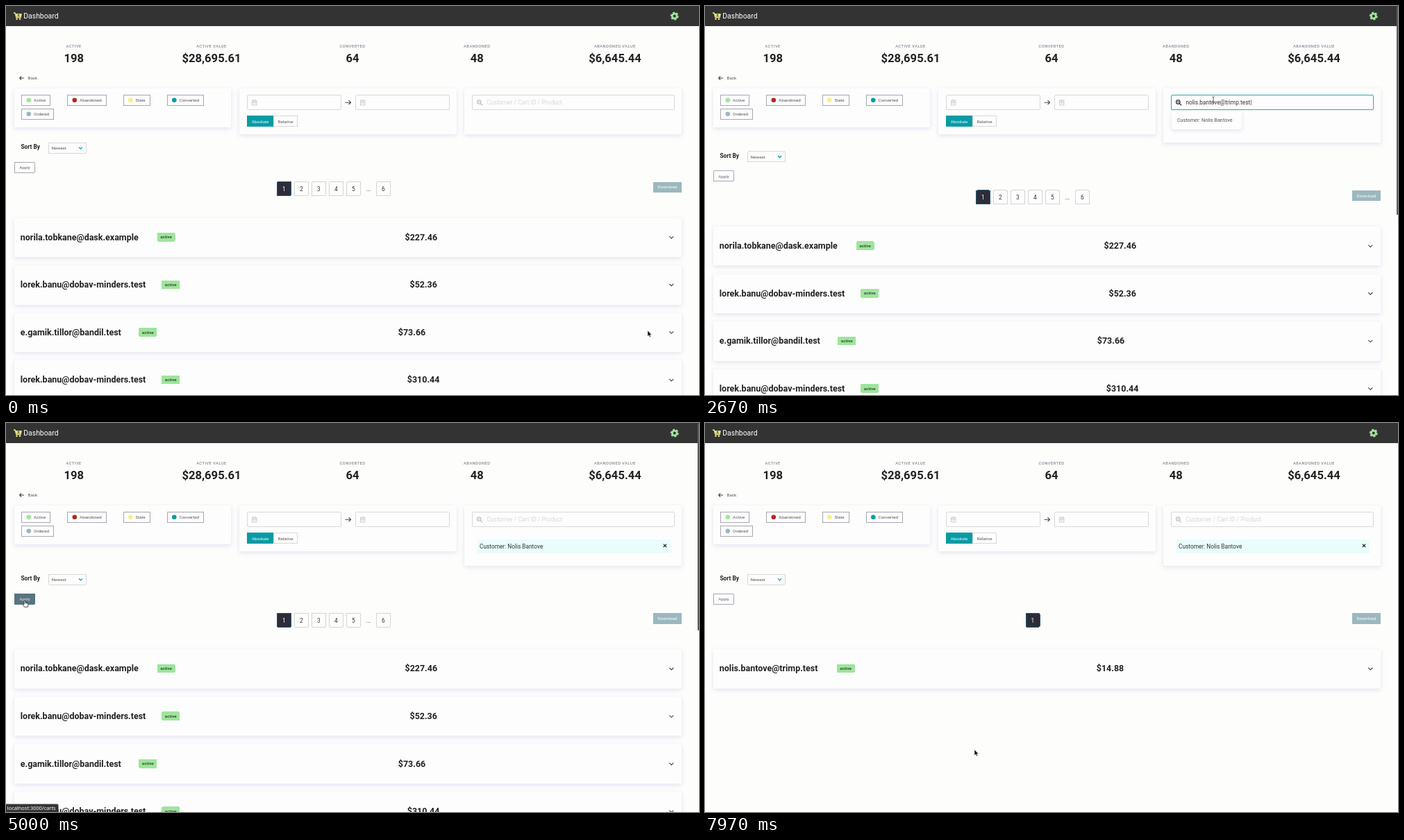
An HTML page that plays this animation: 998 by 561 pixels, repeating every 8 s.

```html
<!DOCTYPE html>
<html lang="en">
<head>
<meta charset="utf-8">
<title>Dashboard</title>
<style>
  html, body { margin: 0; width: 100%; height: 100%; overflow: hidden; background: #fdfdfc; }
  svg { display: block; width: 100vw; height: 100vh; }
  rect { shape-rendering: crispEdges; }
  text { font: 6.24px Roboto, sans-serif; fill: #555; white-space: pre; }
  .mid { text-anchor: middle; }
  .label { font-size: 5.72px; letter-spacing: .5px; fill: #666a78; }
  .value { font-size: 16.64px; font-weight: 600; fill: #222; }
  .title { font-size: 12.48px; font-weight: 600; fill: #222; }
  .badge { font-weight: 500; fill: #224022; }
  .field { font-size: 8.32px; fill: #333; }
  .hint { font-size: 8.32px; font-weight: 300; letter-spacing: .15px; fill: #c4c4c4; }
  .sort { font-size: 8.32px; font-weight: 600; fill: #222; }
  .page { font-size: 8.32px; fill: #333; }
  .light { fill: #fff; }
  .panel { fill: #fdfdfd; filter: drop-shadow(0 2px 3px #4048a024); }
  .hover { stroke: #f1c46c; filter: drop-shadow(0 2px 3px #d0605030); }
  .box { fill: #fdfdfd; stroke: #a4a8b1; }
  .input { fill: #fdfdfd; stroke: #d8d8d6; }
  .focus { stroke: #2fa9b4; }
  .line { fill: none; stroke: #444; stroke-width: 1.1; }
</style>
</head>
<body>
<svg id="stage" viewBox="0 0 998 561"></svg>
<script>
const LOOP = 8000;
const CUSTOMER = 'Customer: Nolis Bantove';
const EMAIL = 'nolis.bantove@trimp.test';

const rect = (x, y, w, h, attrs = '') =>
  `<rect x="${x}" y="${y}" width="${w}" height="${h}" ${attrs}/>`;
const text = (x, y, content, cls = '', attrs = '') =>
  `<text x="${x}" y="${y}" class="${cls}" ${attrs}>${content}</text>`;
const path = (d, attrs = 'class="line"') => `<path d="${d}" ${attrs}/>`;
const group = (id, ...parts) => `<g id="${id}">${parts.join('')}</g>`;
const panel = (x, y, w, h, attrs = '') => rect(x, y, w, h, `rx="2" class="panel" ${attrs}`);

const stat = (x, label, value) => text(x, 60, label, 'label mid') + text(x, 80.9, value, 'value mid');

const filter = (x, y, w, label, color, dot) =>
  rect(x + .5, y + .5, w, 15, 'rx="1" class="box"') +
  `<circle cx="${dot}" cy="${y + 7.8}" r="3.3" fill="${color}"/>` +
  text(dot + 7.3, y + 10, label);

const dateInput = x =>
  rect(x + .5, 128.5, 135, 21, 'rx="2" class="input"') +
  path(`M${x + 7.5} 136.3h6.4v6.6h-6.4zm0 2h6.4m-4.6-3.6v2m2.8-2v2m-3 3.4h3.4`,
    'fill="none" stroke="#c9c9c9" stroke-width="1"');

const pageButton = (x, n, current) =>
  rect(x + .5, 253.5, 20, 20, `rx="1.5" ${current
    ? 'fill="#2d2c39" stroke="#1f5a75"' : 'fill="#fdfdfd" stroke="#d4d4d2"'}`) +
  text(x + 10.3, 266.8, n, `page mid ${current ? 'light' : ''}`);

const card = (i, email, badgeX, price, priceX) => {
  const y = i * 68.56;
  return `<g transform="translate(0 ${y})">` +
    panel(11.5, 305.5, 961.5, 56.5, `data-top="${305 + y}"`) +
    text(20.8, 337.6, email, 'title') +
    rect(badgeX, 327, 26, 12.6, 'rx="1.5" fill="#9fe49c"') +
    text(badgeX + 13, 335.4, 'active', 'badge mid') +
    text(priceX, 337.6, price, 'title') +
    path('M955.3 332.2l3 3 3-3') + '</g>';
};

const header = rect(0, 0, 998, 29, 'fill="#333334"') +
  path('M11 10h2l1.9 6.6h6.2l1-4.6h-3', 'fill="none" stroke="#f4ee8c" stroke-width="1.3"') +
  path('M14 11h7.8l-1.2 4.6h-5.4z', 'fill="#f4ee8c"') +
  path('M18 11.3v3.4m-1.7-1.7h3.4', 'stroke="#333334" stroke-width=".9"') +
  '<g fill="#f4ee8c"><circle cx="15.5" cy="18.8" r="1.2"/><circle cx="20" cy="18.8" r="1.2"/></g>' +
  text(25.3, 18.4, 'Dashboard', 'light', 'style="font-size:10.4px"') +
  `<g fill="none" stroke="#9fe49c"><circle cx="962.8" cy="14.6" r="3.4" stroke-width="2.8"/>
   <circle cx="962.8" cy="14.6" r="5.1" stroke-width="1.8" pathLength="12" stroke-dasharray="1.1 .9"/></g>`;

const stats = stat(97.7, 'ACTIVE', '198') + stat(296, 'ACTIVE VALUE', '$28,695.61') +
  stat(499, 'CONVERTED', '64') + stat(678.3, 'ABANDONED', '48') +
  stat(877, 'ABANDONED VALUE', '$6,645.44');

const filters = path('M26 104h-6.4m2.5-2.5l-2.5 2.5 2.5 2.5') + text(31.5, 106.4, 'Back') +
  panel(11.5, 119, 312.5, 56) +
  filter(22, 128, 41, 'Active', '#a0e59d', 32.8) +
  filter(88, 128, 56, 'Abandoned', '#ac2b22', 98.8) +
  filter(169, 128, 38, 'Stale', '#f8ef8c', 179.3) +
  filter(232, 128, 52, 'Converted', '#0b9aa5', 242.3) +
  filter(22, 148, 46, 'Ordered', '#9ab6c2', 32.8) +
  panel(335.5, 119, 313.5, 66) + dateInput(347) + dateInput(503) +
  path('M488.5 139.2h8m-3-3l3 3-3 3') +
  rect(385.5, 158.5, 34, 15, 'rx="1" class="input"') +
  rect(347, 158, 38, 16, 'rx="1" fill="#069ba5"') +
  text(366, 168.5, 'Absolute', 'mid light') + text(402.5, 168.5, 'Relative', 'mid');

const search = panel(660, 119, 313, 66, 'id="searchPanel"') +
  rect(671.5, 128.5, 291, 21, 'rx="2" class="input" id="searchInput"') +
  '<g id="lens" fill="none" stroke-width="1.3"><circle cx="681.3" cy="138.4" r="2.7"/>' +
  path('M683.3 140.5l2.8 2.8M680 138.4h2.6', '') + '</g>' +
  text(692.5, 142, 'Customer / Cart ID / Product', 'hint', 'id="hint"') +
  text(692.5, 142, '', 'field', 'id="typed"') +
  group('tag', rect(678.5, 168, 278, 20, 'fill="#e9fdfb"'),
    text(682, 181.2, CUSTOMER, 'field'),
    path('M946.8 174.6l4.4 4.4m0-4.4l-4.4 4.4', 'stroke="#222" stroke-width="1.2"')) +
  group('dropdown', panel(671.5, 150.5, 101.5, 27),
    text(679.8, 166.6, CUSTOMER, '', 'style="font-size:7.28px"'));

const lower = group('lower',
  text(21.5, 206.4, 'Sort By', 'sort'),
  rect(61.5, 197.5, 54, 15, 'rx="1" class="input"'), text(65.8, 207.3, 'Newest', '', 'fill="#333"'),
  path('M105 203.6l2.5 2.5 2.5-2.5', 'fill="none" stroke="#069ba5" stroke-width="1.3"'),
  rect(12.5, 225.5, 28.5, 15, 'rx=".5" class="box"'),
  rect(12, 225, 29.5, 16, 'rx=".5" fill="#587480" id="applyFill"'),
  text(27, 235.4, 'Apply', 'mid', 'id="applyText"'),
  rect(932, 253.5, 41, 15.5, 'rx="1" fill="#9bb8bf"'), text(952.5, 263.4, 'Download', 'mid light'),
  group('allCarts',
    [1, 2, 3, 4, 5].map(n => pageButton(365 + 25 * n, n, n === 1)).join(''),
    text(522, 266.8, '...', 'page mid'), pageButton(533, 6),
    card(0, 'norila.tobkane@dask.example', 217.5, '$227.46', 574.5),
    card(1, 'lorek.banu@dobav-minders.test', 224.2, '$52.36', 581.5),
    card(2, 'e.gamik.tillor@bandil.test', 191.2, '$73.66', 564.8),
    card(3, 'lorek.banu@dobav-minders.test', 224.2, '$310.44', 577.8)),
  group('foundCart', pageButton(461.5, 1, true), card(0, EMAIL, 189.5, '$14.88', 563.8)));

const overlays =
  rect(996, 1, 2, 304, 'fill="#5c5c5c" id="scrollbar"') +
  group('status', path('M0 549.5h73.5q2 0 2 2V561H0z', 'fill="#353535"'),
    text(1.8, 557.8, 'localhost:3000/carts', 'light', 'style="font:7.4px \'Noto Sans\',sans-serif"')) +
  group('pointer',
    path('M0 0V8.4L1.9 6.7 3.2 9.5 4.6 8.9 3.4 6.2H5.9Z', 'id="arrow" fill="#111" stroke="#fff" stroke-width=".5"'),
    path('M-1.8-4q1.3 0 1.8.6q.5-.6 1.8-.6M0-3.4v7.2M-1.8 4.4q1.3 0 1.8-.6q.5.6 1.8.6',
      'id="beam" fill="none" stroke="#333" stroke-width=".8"'),
    path('M-.9 0q.9-1 1.8 0v3.4l3.3.8q1 .3.8 1.5l-.7 3.6H-.5L-3 5.8q0-1.2 1.2-.8l.9.8z',
      'id="hand" fill="#fff" stroke="#222" stroke-width=".8"'));

document.getElementById('stage').innerHTML = header + stats + filters + search + lower + overlays;
const el = id => document.getElementById(id);
const show = (id, visible) => el(id).style.display = visible ? '' : 'none';
const cards = [...document.querySelectorAll('[data-top]')];

const clamp = v => Math.max(0, Math.min(1, v));
const ramp = (t, a, b) => clamp((t - a) / (b - a));
const smooth = p => p * p * (3 - 2 * p);
const easeIn = p => p ** 1.7;
const easeOut = p => 1 - (1 - p) ** 1.8;

// Each leg: start, end, destination, easing
const START = [924, 468];
const LEGS = [
  [60, 1480, 740, 173, smooth],
  [1540, 1760, 732, 135, smooth],
  [2900, 3200, 730, 165, smooth],
  [3700, 4250, 27, 256, smooth],
  [5450, 5970, 200, 340, easeIn],
  [5970, 6930, 388, 471, easeOut],
];

function pointerAt(t) {
  let [x, y] = START;
  for (const [from, to, nx, ny, ease] of LEGS) {
    const p = ease(ramp(t, from, to));
    x += (nx - x) * p;
    y += (ny - y) * p;
  }
  return [x, y];
}

function draw(t) {
  const focused = t >= 1950 && t < 3470;
  const pasted = t >= 2440 && t < 3470;
  const listed = t >= 2570 && t < 3800;
  const picked = t >= 3470;
  const found = t >= 5350;
  const shift = (listed ? 12.48 : 0) + (picked ? 20.8 : 0);
  const [x, y] = pointerAt(t);

  el('searchPanel').setAttribute('height', 66 + shift);
  el('searchInput').classList.toggle('focus', focused);
  el('lens').setAttribute('stroke', focused ? '#333' : '#c4c4c4');
  el('typed').textContent = (pasted ? EMAIL : '') + (focused ? '|' : '');
  show('hint', !pasted);
  show('dropdown', listed);
  show('tag', picked);
  el('tag').setAttribute('transform', `translate(0 ${listed ? 12.48 : 0})`);
  el('lower').setAttribute('transform', `translate(0 ${shift})`);
  show('allCarts', !found);
  show('foundCart', found);

  const apply = ramp(t, 4170, 4300) * (1 - ramp(t, 5560, 5690));
  el('applyFill').style.opacity = apply;
  el('applyText').style.fill = apply > .5 ? '#e2e8ea' : '#666';
  show('status', t >= 4220 && t < 5640);

  el('scrollbar').setAttribute('height', 304 - .3 * shift);
  el('scrollbar').style.opacity = found ? 0 : ramp(t, 800, 950);

  for (const node of cards) {
    const top = +node.dataset.top + shift;
    node.classList.toggle('hover', t > 60 && x < 973 && y > top && y < top + 57);
  }

  const overInput = y > 128 && y < 150 && x > 671 && x < 963;
  const overApply = t > 4170 && t < 5620;
  show('beam', overInput);
  show('hand', overApply);
  show('arrow', !overInput && !overApply);
  el('pointer').setAttribute('transform', `translate(${x} ${y})`);
}

function frame() {
  draw(performance.now() % LOOP);
  requestAnimationFrame(frame);
}
frame();
</script>
</body>
</html>
```
